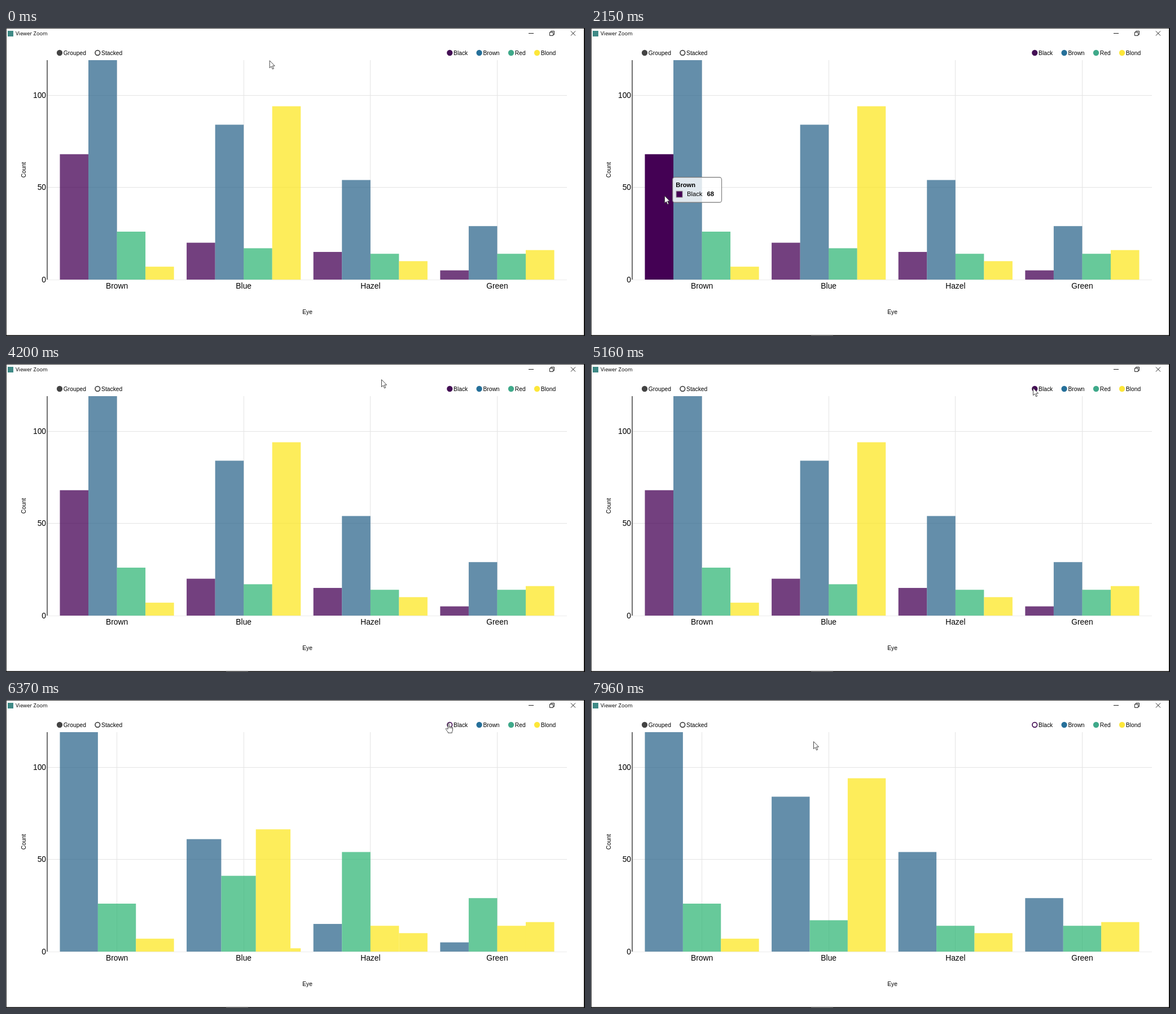
Recreate the animation shown at these times as an HTML page. Size 1026 by 546 pixels, loop 8000 ms.

```html
<!DOCTYPE html>
<html lang="en">
<head>
<meta charset="utf-8">
<title>Viewer Zoom</title>
<style>
  html, body { margin: 0; width: 100%; height: 100%; overflow: hidden; background: #fff; }
  svg { display: block; width: 100vw; height: 100vh; }
  text { font-family: "Liberation Sans", Arial, sans-serif; font-size: 10.3px; fill: #000; }
  .tick { font-size: 13.8px; }
  .title { font-family: "Open Sans", "Noto Sans", sans-serif; font-size: 9.3px; }
  .tip text { font-size: 11.15px; }
  .tip .bold { font-weight: bold; }
  .grid { stroke: #e4e4e4; shape-rendering: crispEdges; }
</style>
</head>
<body>
<svg id="stage" viewBox="0 0 1026 546"></svg>
<script>
const LOOP = 8000;
const LEFT = 73, RIGHT = 994, TOP = 57, BASE = 446, UNIT = (BASE - TOP) / 119;
const STEP = (RIGHT - LEFT) / 4.1, BAND = STEP * 0.9;
const EYES = ["Brown", "Blue", "Hazel", "Green"];
const HAIR = [
  { name: "Black", fill: "#440154", dot: "#440f55", x: 786.3, counts: [68, 20, 15, 5] },
  { name: "Brown", fill: "#31688e", dot: "#26709a", x: 838.6, counts: [119, 84, 54, 29] },
  { name: "Red", fill: "#35b779", dot: "#3fa98a", x: 895, counts: [26, 17, 14, 14] },
  { name: "Blond", fill: "#fde725", dot: "#fde73a", x: 941, counts: [7, 94, 10, 16] }
];

// Legend click: each group regroups one after another.
const CLICK = 5904, GROUP_DELAY = 329, GROUP_TIME = 250, EXIT_LEAD = 70;
// Hover: pointer over Brown, then Black, then Brown again.
const TIP_ON = 1290, TO_BLACK = 1490, TO_BROWN = 2330, HOVER_END = 3600;
const HAND_ON = 5400, HAND_OFF = 6960;
const TIP_LAG = 70, TIP_LAST = 3350;

// [ms, x, y] of the pointer tip
const PATH = [
  [0, 467, 57], [450, 328, 95], [700, 222, 160], [840, 169, 204], [910, 181, 223],
  [1280, 181, 223], [1310, 172, 228], [1450, 131, 262], [1700, 126, 272],
  [2080, 127, 285], [2200, 132, 305], [2400, 155, 345], [2630, 180, 365],
  [2830, 180, 365], [2930, 194, 369], [3000, 189, 364], [3090, 189, 364],
  [3200, 186, 270], [3350, 177, 90], [3510, 131, 2], [3860, 131, 2],
  [4050, 430, 8], [4200, 665, 27], [4400, 665, 27], [4800, 735, 38],
  [5160, 783, 42], [6900, 783, 42], [7150, 660, 52], [7400, 505, 68],
  [7560, 439, 76], [7840, 439, 76], [7960, 394, 73], [8000, 394, 73]
];

const stage = document.getElementById("stage");

function add(parent, tag, attrs, text) {
  const el = document.createElementNS("http://www.w3.org/2000/svg", tag);
  set(el, attrs);
  if (text !== undefined) el.textContent = text;
  parent.appendChild(el);
  return el;
}
function set(el, attrs) {
  for (const key in attrs) el.setAttribute(key, attrs[key]);
}
const clamp = v => Math.max(0, Math.min(1, v));
const mix = (a, b, p) => a + (b - a) * p;
const cubic = v => {
  const p = clamp(v);
  return p < 0.5 ? 4 * p ** 3 : 1 - 4 * (1 - p) ** 3;
};
const line = (parent, x1, y1, x2, y2, attrs) => add(parent, "line", { x1, y1, x2, y2, ...attrs });
const label = (x, y, text, attrs) => add(stage, "text", { x, y, ...attrs }, text);

function pointerAt(t) {
  let i = 1;
  while (i < PATH.length - 1 && PATH[i][0] < t) i++;
  const [t0, x0, y0] = PATH[i - 1], [t1, x1, y1] = PATH[i];
  const p = clamp((t - t0) / (t1 - t0));
  return [mix(x0, x1, p), mix(y0, y1, p)];
}

// Window frame
add(stage, "rect", { width: 1026, height: 546, fill: "#fff" });
add(stage, "rect", { x: 3, y: 5, width: 10, height: 10, fill: "#3f8a86" });
label(17, 13.3, "Viewer Zoom", { class: "title" });
add(stage, "path", {
  d: "M926 9.5H935M963.5 7.5H969.5V13.5H963.5ZM965.5 7.5V5.5H971.5V11.5H969.5M1001 5.5L1009 13.5M1009 5.5L1001 13.5",
  fill: "none", stroke: "#222"
});
add(stage, "rect", { width: 1026, height: 1, fill: "#333" });
add(stage, "rect", { width: 1, height: 546, fill: "#333" });
add(stage, "rect", { x: 1024, width: 2, height: 546, fill: "#111" });
add(stage, "rect", { y: 544.4, width: 1026, height: 1.6, fill: "#111" });
const taskMark = add(stage, "rect", { x: 390, y: 544.6, width: 39, height: 1.4, fill: "#555" });

// Grid and axes
EYES.forEach((eye, g) => {
  const x = LEFT + STEP * (g + 0.55);
  line(stage, x, TOP, x, BASE, { class: "grid" });
  label(x, 461.8, eye, { class: "tick", "text-anchor": "middle" });
});
[0, 50, 100].forEach(n => {
  const y = BASE - n * UNIT;
  line(stage, LEFT, y, RIGHT, y, { class: "grid", opacity: n ? 1 : 0.7 });
  label(71, y + 4.9, n, { class: "tick", "text-anchor": "end" });
});
label(534, 506.6, "Eye", { "text-anchor": "middle" });
label(0, 0, "Count", { "text-anchor": "middle", transform: "translate(34.7 251.5) rotate(-90)" });

const bars = EYES.map(() => HAIR.map(() => add(stage, "rect", {})));
line(stage, 73, TOP, 73, BASE, { stroke: "#333", "stroke-width": 1.4 });

// Legends
function key(x, text, color, filled) {
  label(x + 6.8, 47.7, text);
  return add(stage, "circle", {
    cx: x, cy: 44, r: 4.3, fill: filled ? color : "#fff", stroke: color, "stroke-width": 1.7
  });
}
key(95, "Grouped", "#444", true);
key(162.3, "Stacked", "#444", false);
const dots = HAIR.map(h => key(h.x, h.name, h.dot, true));

// Tooltip
const tip = add(stage, "g", { class: "tip" });
const tipBox = add(tip, "rect", {
  x: 0.5, y: 0.5, height: 44.5, rx: 4, fill: "#fff", "fill-opacity": 0.8, stroke: "#777", "stroke-width": 1.1
});
add(tip, "text", { x: 6.3, y: 18.2, class: "bold" }, "Brown");
const tipSwatch = add(tip, "rect", { x: 7, y: 25, width: 11, height: 11, stroke: "#999" });
const tipName = add(tip, "text", { x: 26, y: 34.3 });
const tipValue = add(tip, "text", { y: 34.3, class: "bold" });

// Pointers, tip at 0,0
const ink = { fill: "#fff", stroke: "#333", "stroke-width": 0.9, "stroke-linejoin": "round" };
const arrow = add(stage, "path", {
  d: "M.5 .7V13.6L3.5 10.9L5.6 15.8L7.7 14.9L5.6 10.1H9.6Z", ...ink
});
const hand = add(stage, "path", {
  d: "M0 0Q0 -1 1 -1T2.2 0V5Q4 4.2 4.6 5.6Q6.2 5 6.8 6.3Q8.5 6 8.5 8V11Q8.5 13 7.3 14.5V16.3H.3V15Q-1.5 13 -3.6 9.6Q-4 8.3 -2.7 8.2Q-1.6 8.4 0 10ZM2.2 5V8M4.6 5.6V8.3M6.8 6.3V8.6", ...ink
});

function hover(t, s) {
  if (s === 1 && t < HOVER_END) {
    const first = clamp((t - 1000) / 250) - clamp((t - TO_BLACK) / 250);
    return first + clamp((t - TO_BROWN) / 250);
  }
  return s === 0 ? clamp((t - TO_BLACK) / 250) - clamp((t - TO_BROWN) / 250) : 0;
}

function drawBars(t) {
  const clicked = t >= CLICK;
  EYES.forEach((_, g) => {
    const start = CLICK + g * GROUP_DELAY;
    const p = cubic((t - start) / GROUP_TIME);
    const gone = clicked ? cubic((t - start + EXIT_LEAD) / GROUP_TIME) : 0;
    const left = LEFT + STEP * 0.1 + STEP * g;
    const width = mix(BAND / 4, BAND / 3, p);
    HAIR.forEach((h, s) => {
      const last = s === 3;
      const count = last ? h.counts[g] * (1 - gone) : mix(h.counts[g], HAIR[s + 1].counts[g], p);
      set(bars[g][s], {
        x: left + s * width,
        y: BASE - count * UNIT,
        width: last ? Math.max(0, BAND - 3 * width) : width,
        height: count * UNIT,
        fill: HAIR[clicked ? Math.min(s + 1, 3) : s].fill,
        "fill-opacity": 0.75 + (g === 0 ? 0.25 * hover(t, s) : 0)
      });
    });
  });
}

function drawTip(t) {
  const shown = t >= TIP_ON && t < HOVER_END;
  tip.style.display = shown ? "" : "none";
  if (!shown) return;
  const [x, y] = pointerAt(Math.min(t - TIP_LAG, TIP_LAST));
  const black = t >= TO_BLACK && t < TO_BROWN;
  const hair = HAIR[black ? 0 : 1];
  set(tip, { transform: `translate(${x + 17} ${y - 21})` });
  set(tipBox, { width: black ? 87 : 97 });
  set(tipSwatch, { fill: hair.fill });
  set(tipValue, { x: black ? 61.5 : 65.6 });
  tipName.textContent = hair.name;
  tipValue.textContent = hair.counts[0];
}

function draw(t) {
  drawBars(t);
  drawTip(t);
  set(dots[0], { fill: t >= CLICK ? "#fff" : HAIR[0].dot });
  taskMark.style.display = t > 400 ? "" : "none";
  const [x, y] = pointerAt(t);
  const isHand = t >= HAND_ON && t < HAND_OFF;
  arrow.style.display = isHand ? "none" : "";
  hand.style.display = isHand ? "" : "none";
  set(isHand ? hand : arrow, { transform: `translate(${x} ${y})` });
}

function frame() {
  draw(performance.now() % LOOP);
  requestAnimationFrame(frame);
}
frame();
</script>
</body>
</html>
```
